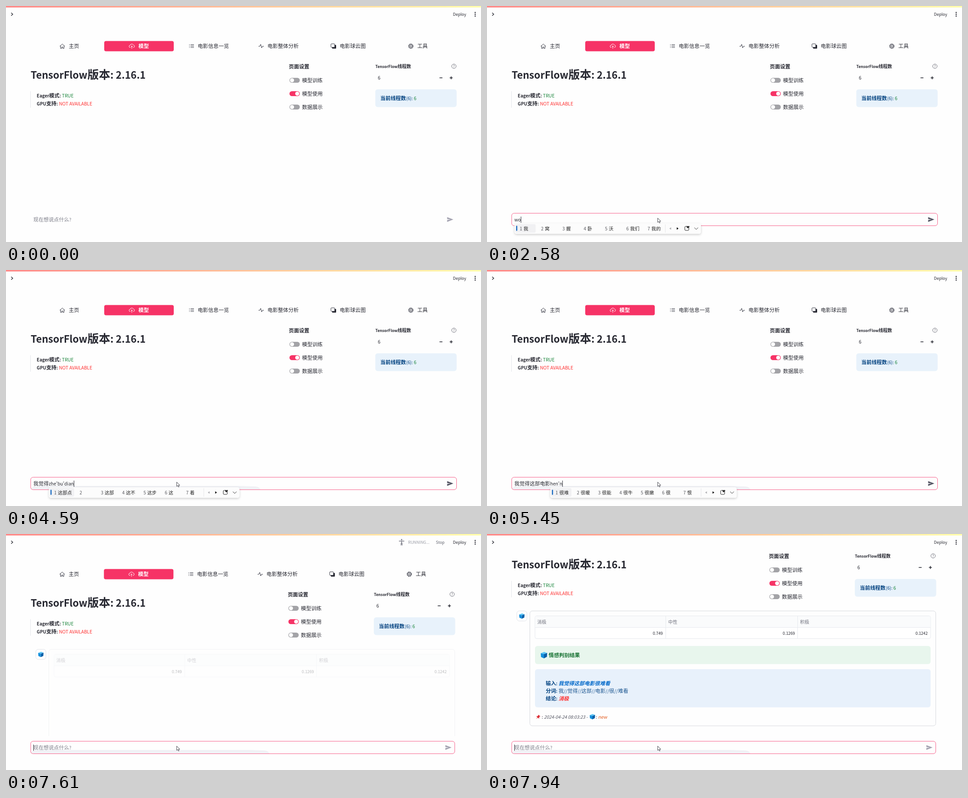
An HTML page for the animation above (7.99 s loop, 1059x529 px).

```html
<!DOCTYPE html>
<html lang="zh">
<head>
<meta charset="utf-8">
<style>
html, body { margin: 0; width: 100%; height: 100%; overflow: hidden; background: #fefefe; }
svg { display: block; width: 100%; height: 100%; }
text { font-family: "Noto Sans CJK SC", "Noto Sans CJK", "Noto Sans", sans-serif; white-space: pre; }
.line { fill: none; stroke: #31333f; stroke-width: 1; }
</style>
</head>
<body>
<svg id="stage" viewBox="0 0 1059 529" xmlns="http://www.w3.org/2000/svg"></svg>
<script>
const LOOP = 7990, EM = 11.4;
const INK = '#262730', PINK = '#f63366', NAVY = '#004280', GREEN = '#158237', RED = '#ff2b2b';
const stage = document.getElementById('stage');
const $ = id => document.getElementById(id);

// Latin runs are set smaller than the Chinese ones, as in a mixed font stack.
function runs(str, size, bold) {
  return str.replace(/[\u2e80-\uffef]+|[^\u2e80-\uffef]+/g, s =>
    `<tspan font-size="${(/[\u2e80-\uffef]/.test(s) ? size : size * (bold ? .87 : .895)).toFixed(2)}">${s}</tspan>`);
}
function txt(x, y, str, { size = EM, fill = INK, bold, italic, anchor = 'start', id } = {}) {
  return `<text x="${x}" y="${y}" fill="${fill}" text-anchor="${anchor}"` +
    `${bold ? ' font-weight="700"' : ''}${italic ? ' font-style="italic"' : ''}${id ? ` id="${id}"` : ''}>` +
    runs(str, size, bold) + '</text>';
}
const box = (x, y, w, h, r, attrs) => `<rect x="${x}" y="${y}" width="${w}" height="${h}" rx="${r}" ${attrs}/>`;
const path = (d, attrs = 'class="line"') => `<path d="${d}" ${attrs}/>`;
const col = (x, body) => `<g class="col" data-x="${x}">${body}</g>`;

function cube(x, y, s) {
  return `<g transform="translate(${x} ${y}) scale(${s})">` +
    path('M-6-3.5L.5-6 6-4 0-1.8Z', 'fill="#5cc4f5"') +
    path('M-6-3.5L0-1.8V6L-5.5 3.5Z', 'fill="#1590dc"') +
    path('M0-1.8L6-4 5.5 3.2 0 6Z', 'fill="#0a5fa8"') + '</g>';
}

function toggle(y, label, on) {
  return box(632, y - 5.5, 23, 11, 5.5, `fill="${on ? PINK : '#a3a3a7'}"`) +
    `<circle cx="${on ? 649.3 : 637.7}" cy="${y}" r="4.5" fill="#fff"/>` + txt(660, y + 4, label, { size: 11.5 });
}

const tabs = [
  [120, 140, '主页', path('M119.8 90.4l5.7-5.2 5.7 5.2M121.7 89v6h2.6v-3h2.4v3h2.6v-6')],
  [219, 295.3, '模型', path('M277.6 93h-.6a2.5 2.5 0 0 1-.2-5 4 4 0 0 1 7.4-.6 2.9 2.9 0 0 1 .3 5.6h-1M280.5 95.6v-6.2M278.5 91.2l2-2 2 2', 'fill="none" stroke="#fff"')],
  [408, 427.5, '电影信息一览', path('M408.3 86.5h1.4M411.5 86.5h7.5M408.3 89.7h1.4M411.5 89.7h7.5M408.3 92.9h1.4M411.5 92.9h7.5')],
  [563, 583, '电影整体分析', path('M563 90.3h2.8l2-4.4 2.3 8 1.7-3.6h2.9')],
  [724, 744, '电影球云图', box(727, 87.3, 9, 8.2, 1.2, `fill="${INK}"`) + box(724.5, 84.8, 8.3, 7.8, 1, 'fill="#fff" class="line" style="fill:#fff"')],
  [897, 917, '工具', '<circle cx="902.6" cy="90" r="4.7" class="line" stroke-dasharray="2.6 1.1" style="stroke-width:1.5"/><circle cx="902.6" cy="90" r="4" class="line" style="stroke-width:.7"/><circle cx="902.6" cy="90" r="1.8" class="line"/>'],
].map(([x, tx, label, icon], i) => col(x,
  (i === 1 ? box(219, 78.5, 155, 23, 4, `fill="${PINK}"`) : '') + icon +
  txt(tx, 94.3, label, { size: 11.6, fill: i === 1 ? '#fff' : INK, bold: i === 1 }))).join('');

const page = tabs +
  txt(55, 163, 'TensorFlow版本: 2.16.1', { size: 25.5, bold: true }) +
  path('M54.6 191V228', 'stroke="#e3e5ea"') +
  txt(68.6, 205, 'Eager模式:', { bold: true }) + txt(124.8, 205, 'TRUE', { fill: GREEN }) +
  txt(68.6, 223.2, 'GPU支持:', { bold: true }) + txt(118.2, 223.2, 'NOT AVAILABLE', { fill: RED }) +
  col(631, txt(630.6, 140, '页面设置', { bold: true }) +
    toggle(166.5, '模型训练') + toggle(196.5, '模型使用', true) + toggle(226.5, '数据展示')) +
  col(823, txt(823.5, 138.6, 'TensorFlow线程数', { size: 10, bold: true }) + txt(829, 165, '6') +
    box(823.3, 186.7, 181.4, 39.8, 5.5, 'fill="#e8f2fb"') +
    txt(834.6, 211, '当前线程数', { bold: true, fill: NAVY }) + txt(892, 211, '(6):', { fill: NAVY }) +
    txt(909.3, 211, '6', { fill: GREEN })) +
  col(1004, '<circle cx="998.6" cy="135" r="4.9" fill="none" stroke="#6f707b"/>' +
    txt(998.6, 138, '?', { size: 9, fill: '#5f606b', anchor: 'middle' }) +
    path('M966.5 161h6.5M989.2 161h6.6M992.5 157.7v6.6', `stroke="${INK}" stroke-width="1.7"`));

// Result card, in page coordinates.
const cell = { size: 10 };
const result =
  `<g id="avatar">${box(66.5, 258.5, 22.5, 22.5, 5.5, 'fill="#fff" stroke="#e0e2e8"')}${cube(77.7, 270, 1)}</g>` +
  `<g id="table">${box(95.5, 258.5, 905, 257.5, 5.5, 'fill="none" stroke="#d6d8de"')}` +
  box(107, 269.5, 882, 51, 4, 'fill="#fff" stroke="#e6e9ee"') +
  path('M107.5 295.2H988.5V273q0-3-3-3H110.5q-3 0-3 3Z', 'fill="#fafbfc"') +
  path('M107 295.5H989M398.5 269.5V320.5M692.5 269.5V320.5', 'stroke="#e6e9ee"') +
  [[112, '消极', 392, '0.749'], [404, '中性', 686.5, '0.1269'], [698, '积极', 982.5, '0.1242']].map(([x, head, r, v]) =>
    txt(x, 286.5, head, { size: 10.2, fill: '#70727e' }) + txt(r, 311.5, v, { ...cell, anchor: 'end' })).join('') + '</g>' +
  `<g id="verdict">${box(107, 337, 882, 40.5, 5.5, 'fill="#e8f6ed"')}${cube(127, 357.5, 1.2)}` +
  txt(137.6, 362, '情感判别结果', { size: 11.6, fill: '#177233', bold: true }) +
  box(107, 389, 882, 85.5, 5.5, 'fill="#e8f1fb"') +
  ['输入:', '分词:', '结论:'].map((s, i) => txt(131, 425 + i * 17.2, s, { bold: true, fill: NAVY })).join('') +
  txt(159.6, 425, '我觉得这部电影很难看', { size: 11.5, bold: true, italic: true, fill: '#0068c9' }) +
  txt(159.6, 442.2, '我//觉得//这部//电影//很//难看', { size: 11.5, fill: '#1a5590' }) +
  txt(159.6, 459.4, '消极', { size: 11.5, bold: true, italic: true, fill: RED }) + '</g>' +
  '<g id="footer">' + path('M114 491l5 3.5-1.5.6-1.3 2.4.2 2.4-3-2.2-3.7 3 2.6-3.8-2.6-2.3 2.7-.2 1.9-1.9Z', 'fill="#dd2e35"') +
  txt(122, 499.5, ':') + txt(127, 499.5, '2024-04-24 08:03:23 -', { size: 11.1, italic: true, fill: '#555763' }) +
  cube(235, 495.5, 1) + txt(242.6, 499.5, ':') + txt(247.6, 499.5, 'new', { italic: true, fill: '#e2591b' }) + '</g>';

const header =
  box(0, 0, 1059, 36, 0, 'fill="#fefefe"') + box(0, .8, 1059, 2, 0, 'fill="url(#rainbow)"') +
  path('M11.6 15.2l3.4 3.3-3.4 3.3', `fill="none" stroke="${INK}" stroke-width="1.4"`) +
  txt(996.6, 22, 'Deploy', { size: 10 }) +
  [14.6, 18.6, 22.6].map(y => `<circle cx="1046" cy="${y}" r="1.3" fill="${INK}"/>`).join('') +
  '<g id="running"><circle cx="882" cy="12.8" r="1.7" fill="#8b8c96"/>' +
  path('', 'id="runner" fill="none" stroke="#8b8c96" stroke-width="1.8"') +
  txt(896.5, 22, 'RUNNING...', { size: 10, fill: '#9a9ca6' }) + txt(958.6, 22, 'Stop', { size: 10, fill: '#62646f' }) + '</g>';

stage.innerHTML = `<defs>
  <linearGradient id="rainbow"><stop stop-color="#ff4b4b"/><stop offset="1" stop-color="#fffd80"/></linearGradient>
  <clipPath id="view"><rect width="1059" height="453"/></clipPath>
  <filter id="soft" x="-5%" y="-50%" width="110%" height="220%"><feDropShadow dx="0" dy="2" stdDeviation="2.5" flood-opacity=".2"/></filter>
  </defs>${box(0, 0, 1059, 529, 0, 'fill="#fefefe"')}
  <g clip-path="url(#view)"><g id="page">${page}${result}</g></g>${header}
  <path id="band" fill="#f1f2f6"/>
  ${box(55, 464.5, 949.5, 28, 5.5, 'id="field" fill="none" stroke="#f75f89"')}
  ${txt(61, 483, '', { id: 'typed' })}
  <path id="caret" stroke="#262730" stroke-width="1"/>
  <path id="send" d="M983.5 473.3L997.3 478.6 983.5 484 983.5 479.8 991 478.6 983.5 477.5Z"/>
  <g id="popup"></g>
  <g id="arrow">${path('M0 0V9.6L2.2 7.6 3.8 11 5.4 10.3 3.9 7H6.8Z', 'fill="#fff" stroke="#33343c" stroke-width=".9"')}</g>
  ${path('M379.2 471.6h1.6l.9.6.9-.6h1.6M381.7 472.2v8M379.2 480.8h1.6l.9-.6.9.6h1.6', 'id="beam" fill="none" stroke="#33343c"')}`;

// Input method steps: time, committed text, letters, candidates.
const A = '我觉得', B = A + '这部电影', C = B + '很难看';
const steps = [
  [0, '', '', ''],
  [2420, '', 'w', '我,为,完,无,问,玩,王'],
  [2580, '', 'wo', '我,窝,握,卧,沃,我们,我的'],
  [2720, '', "wo'j", '我就,我家,我将,我见,我叫,我,窝'],
  [2850, '', "wo'j", '我就,我觉,我家,我将,我叫,我,窝'],
  [3000, '', "wo'ju", '我据,我居,我举,我觉,我就,我,窝'],
  [3190, '', "wo'jue'd", '我觉得,我决定,我绝对,我觉的,我觉,我,窝'],
  [3320, A, '', ''],
  [3600, A, 'z', '在,这,中,做,再,张,着'],
  [3780, A, 'zh', '这,中,张,只,着,周,找'],
  [3880, A, 'zhe', '这,着,者,这个,哲,折,浙'],
  [3980, A, "zhe'b", '这边,这部,这不,这本,这比,这,着'],
  [4120, A, "zhe'bu", '这部,这不,这步,这,着,者,哲'],
  [4300, A, "zhe'bu'd", '这不大,这部的,这不多,这部大,这不对,这部,这'],
  [4390, A, "zhe'bu'di", '这不低,这部第,这不地,这部,这不,这步,这'],
  [4490, A, "zhe'bu'dia", '这部,这不,这步,这,着,者,哲'],
  [4590, A, "zhe'bu'dian", '这部点,,这部,这不,这步,这,着'],
  [4770, A, "zhe'bu'dian'y", '这部电影,,这部,这不,这步,这,着'],
  [4870, B, '', ''],
  [5050, B, 'h', '和,好,会,很,还,后,或'],
  [5130, B, 'he', '和,喝,河,何,合,盒,核'],
  [5210, B, 'hen', '很,恨,狠,痕,和,喝,河'],
  [5290, B, 'hen', '很,恨,狠,痕,很多,和,河'],
  [5450, B, "hen'n", '很难,很暖,很能,很牛,很嫩,很,恨'],
  [5530, B, "hen'na", '很那,很拿,很纳,很难,很,恨,狠'],
  [5600, B, "hen'nan", '很难,很男,很南,很,恨,狠,痕'],
  [5670, B, "hen'nan", '很难,很难看,很难受,很难过,很,恨,狠'],
  [6570, B, "hen'nan'k", '很难看,很难开,很难靠,很难,很,恨,狠'],
  [6700, C, '', ''],
  [6910, '', '', ''],
];

function popup(x, words) {
  let cx = 12, list = '';
  words.split(',').forEach((w, i) => {
    const width = Math.max(47.5, 25.5 + 10.4 * w.length);
    if (!i) list += box(2, 2, width - 2, 19, 3, 'fill="#f1f1f3"') + box(4, 5.5, 2.4, 11.5, 1.2, 'fill="#1467c0"');
    list += txt(cx, 15.8, `${i + 1} `, { size: 11, fill: '#55565c' }) + txt(cx + 8.5, 15.8, w, { size: 10.4, fill: '#222' });
    cx += width;
  });
  const d = cx - 8;
  return `<g transform="translate(${x} 487)">${box(.5, 0, d + 79, 23.5, 4.5, 'fill="#fcfcfc" filter="url(#soft)"')}${list}` +
    path(`M${d} 2.5V21`, 'stroke="#e6e6e8"') +
    path(`M${d + 13} 9v5.4l-4-2.7Z`, 'fill="#b0b0b4"') + path(`M${d + 25.5} 9v5.4l4-2.7Z`, 'fill="#111"') +
    box(d + 43.5, 7, 9, 9, 2, 'fill="none" stroke="#222"') +
    path(`M${d + 50.5} 11.8l-3.4-3.3q-.5-2.6 1.7-2.7l1.7 1 1.7-1q2.2.1 1.7 2.7Z`, 'fill="#222" stroke="#fcfcfc" stroke-width=".6"') +
    path(`M${d + 64.8} 9.8l4.2 4 4.2-4`, 'fill="none" stroke="#333"') + '</g>';
}

const clamp = v => Math.max(0, Math.min(1, v));
const show = (id, on) => $(id).setAttribute('opacity', +on);
const pose = (id, x, y) => $(id).setAttribute('transform', `translate(${x} ${y})`);
const columns = [...document.querySelectorAll('.col')];
let current = null, caretX = 61;

function typing(step) {
  if (step === current) return;
  current = step;
  const [, done, letters, words] = step, text = done + letters, el = $('typed');
  el.innerHTML = runs(text || '现在想说点什么?', EM);
  el.setAttribute('fill', text ? INK : '#7c7d88');
  caretX = text ? 61.5 + el.getComputedTextLength() : 61.5;
  $('popup').innerHTML = words ? popup(61 + EM * done.length, words) : '';
  $('send').setAttribute('fill', text ? '#555564' : '#a5a4b2');
}

function pointer(t) {
  const beam = t >= 1130 && t < 2420;
  show('beam', beam);
  show('arrow', t >= 180 && !beam);
  if (t >= 2420) return pose('arrow', 380.6, 475.4);
  const p = clamp(Math.floor((t - 180) / 62.5 + 1) / 13), e = p * p * (3 - 2 * p);
  const drop = clamp((t - 930) / 200);
  pose('arrow', 704 - 318 * e - 2 * drop, -2 + 457 * e + 10 * drop);
  pose('beam', 0, -3 * (1 - clamp((t - 1130) / 120)));
}

function render(t) {
  typing(steps.findLast(s => s[0] <= t));
  pointer(t);

  const caretOn = t >= 1540 && !(t >= 2050 && t < 2420) && !(t >= 6200 && t < 6570);
  $('caret').setAttribute('d', `M${caretX} 472V486`);
  show('caret', caretOn);
  show('field', t < 1540 ? 0 : t < 1585 ? .6 : t < 1630 ? .8 : 1);

  const w = t < 4300 ? 515 : t < 5450 ? 567 : 587;
  $('band').setAttribute('d', `M56 492V489Q60 484.5 72 484H${w - 46}L${w - 10} 485.2Q${w - 1} 487 ${w} 492Z`);
  show('band', t >= 3320);

  // The scrollbar narrows the layout once the answer arrives.
  const k = t < 7610 ? 0 : -.0042;
  columns.forEach(c => c.setAttribute('transform', `translate(${(c.dataset.x - 55) * k} 0)`));
  $('field').setAttribute('width', k ? 945.5 : 949.5);
  pose('send', k ? -4 : 0, 0);
  pose('page', 0, t < 7860 ? 0 : t < 7940 ? -35.4 : -86);

  show('avatar', t < 7410 ? 0 : t < 7460 ? .5 : 1);
  show('table', t < 7610 ? 0 : clamp(.3 + (t - 7610) / 200));
  show('verdict', t < 7860 ? 0 : t < 7940 ? .23 : 1);
  show('footer', t >= 7940);

  show('running', t < 6910 || t >= 7940 ? 0 : t < 7610 ? clamp(.2 + (t - 6910) / 400) : 1 - .75 * clamp((t - 7610) / 250));
  const s = t < 7410 || t >= 7610 ? 0 : 2;
  $('runner').setAttribute('d', `M876 ${15.8 + s}L882 15.8 888 ${15.8 - s}M882 15.5V20M${880.7 - s} 25.5L881.2 19.5M${883.3 + s} 25.5L882.8 19.5`);
}

(function tick() {
  render(performance.now() % LOOP);
  requestAnimationFrame(tick);
})();
</script>
</body>
</html>
```
